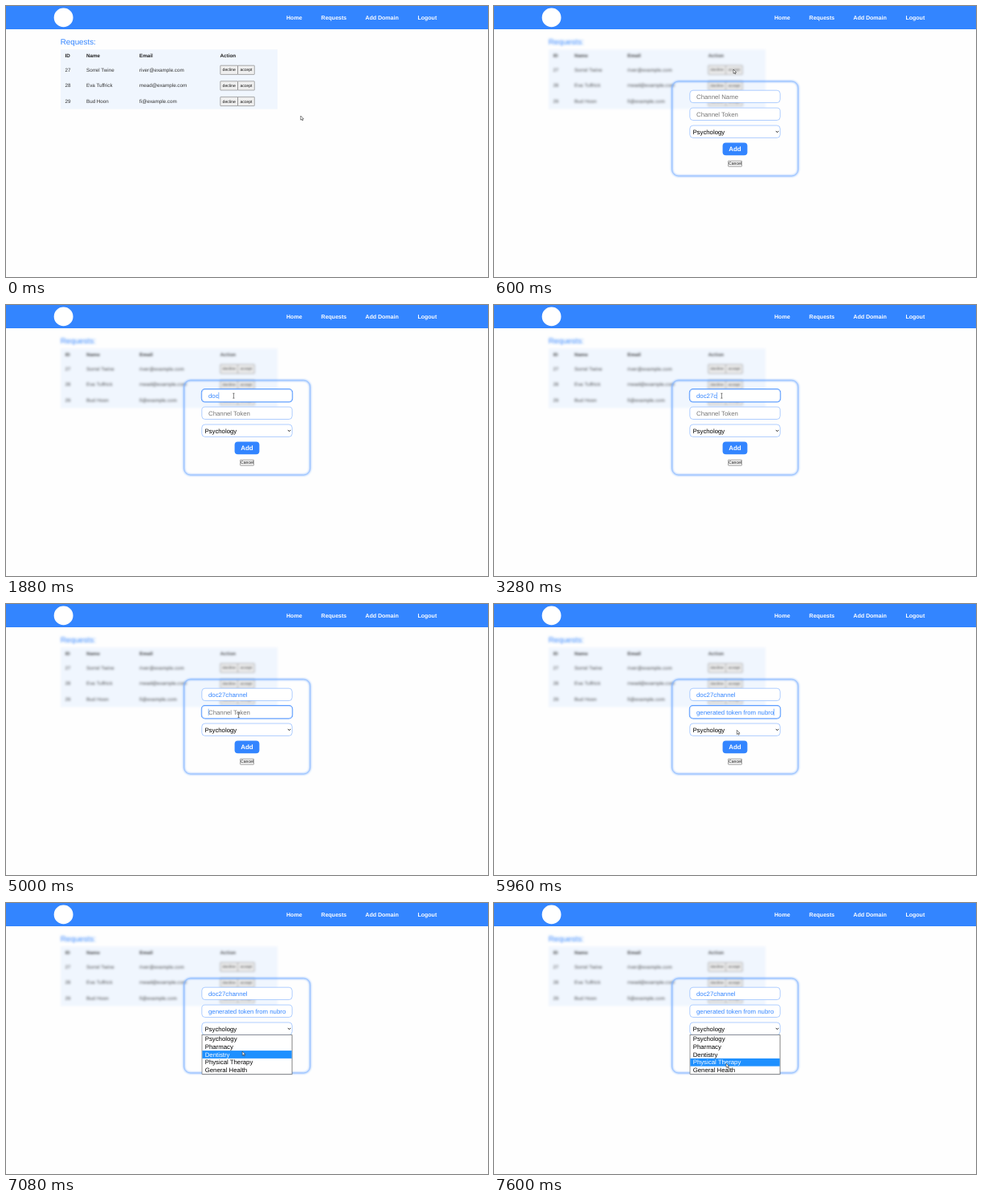
An HTML page for the animation above (8 s loop, 600 px wide and 338 px high).

```html
<!DOCTYPE html>
<html lang="en">
<head>
<meta charset="utf-8">
<title>Requests</title>
<style>
  html, body { margin: 0; width: 100%; height: 100%; overflow: hidden; background: #fefefe; }
  svg { display: block; width: 100%; height: 100%; }
  text { font-family: "Liberation Sans", Arial, sans-serif; white-space: pre; text-rendering: geometricPrecision; }
  .bold { font-weight: bold; }
</style>
</head>
<body>
<svg id="stage" viewBox="0 0 600 338">
  <defs>
    <filter id="soft" filterUnits="userSpaceOnUse" x="50" y="30" width="310" height="115">
      <feGaussianBlur stdDeviation="1.6"/>
    </filter>
    <filter id="glow" filterUnits="userSpaceOnUse" x="210" y="84" width="180" height="140">
      <feGaussianBlur stdDeviation="1.2"/>
    </filter>
    <filter id="ring" filterUnits="userSpaceOnUse" x="236" y="98" width="128" height="50">
      <feGaussianBlur stdDeviation="0.6"/>
    </filter>
  </defs>
</svg>
<script>
const BLUE = '#3385ff', LOOP = 8000, STEP = 40;
const stage = document.getElementById('stage');

function add(parent, tag, attrs, text) {
  const el = document.createElementNS('http://www.w3.org/2000/svg', tag);
  for (const k in attrs) el.setAttribute(k, attrs[k]);
  if (text !== undefined) el.textContent = text;
  parent.appendChild(el);
  return el;
}
const rect = (p, x, y, width, height, attrs) => add(p, 'rect', { x, y, width, height, ...attrs });
const label = (p, x, y, size, fill, text, cls = '') =>
  add(p, 'text', { x, y, 'font-size': size, fill, class: cls }, text);
const group = (p, attrs = {}) => add(p, 'g', attrs);
const show = (el, on) => el.setAttribute('visibility', on ? 'visible' : 'hidden');

function button(p, x, y, w, h, tx, ty, text) {
  const box = rect(p, x, y, w, h, { fill: '#efefef', stroke: '#767676', 'stroke-width': 0.6, rx: 0.5 });
  label(p, tx, ty, 5.1, '#111', text);
  return box;
}

// Header
rect(stage, 0, 0, 600, 29, { fill: BLUE });
add(stage, 'circle', { cx: 71.6, cy: 14.4, r: 11.9, fill: '#fff' });
[[349, 'Home'], [392.3, 'Requests'], [447.3, 'Add Domain'], [512.4, 'Logout']]
  .forEach(([x, s]) => label(stage, x, 17, 7.05, '#fff', s, 'bold'));

// Request list
const list = group(stage);
label(list, 67.7, 48, 9.8, BLUE, 'Requests:');
rect(list, 68, 54.3, 270, 74.2, { fill: '#f0f6fe' });
const cols = [73.6, 100, 166, 266.6];
['ID', 'Name', 'Email', 'Action'].forEach((s, i) => label(list, cols[i], 64.2, 6.25, '#222', s, 'bold'));
const accepts = [
  ['27', 'Sorrel Twine', 'river@example.com'],
  ['28', 'Eva Tuffrick', 'mead@example.com'],
  ['29', 'Bud Hoon', 'fi@example.com']
].map((row, r) => {
  const y = r * 19.6;
  row.forEach((s, i) => label(list, cols[i], 81.7 + y, 6.25, '#333', s));
  button(list, 266.8, 74.2 + y, 21.7, 11.2, 269.6, 81.4 + y, 'decline');
  return button(list, 288.5, 74.2 + y, 20.8, 11.2, 291.4, 81.4 + y, 'accept');
});

// Dialog: see-through, so the blurred list stays visible behind it
const dialog = group(stage);
const panel = { x: 221.6, y: 94, width: 157, height: 118, rx: 8, fill: 'none' };
add(dialog, 'rect', { ...panel, stroke: BLUE, 'stroke-width': 2, opacity: 0.5, filter: 'url(#glow)' });
add(dialog, 'rect', { ...panel, stroke: '#8cb9ff', 'stroke-width': 0.7 });

const edge = { rx: 4, fill: '#fff', stroke: '#85b4ff', 'stroke-width': 0.65 };
function field(y, hint) {
  const ring = rect(dialog, 243.8, y, 112.4, 15.4,
    { rx: 4, fill: 'none', stroke: BLUE, 'stroke-width': 2, opacity: 0.85, filter: 'url(#ring)' });
  rect(dialog, 243.8, y, 112.4, 15.4, edge);
  const text = label(dialog, 252, y + 10.5, 7.8, BLUE, '');
  const caret = rect(dialog, 252, y + 3.6, 0.6, 8.4, { fill: BLUE });
  return (value, focus, blink) => {
    text.textContent = value || hint;
    text.setAttribute('fill', value ? BLUE : '#757575');
    caret.setAttribute('x', 252 + (value ? text.getComputedTextLength() : -0.2));
    show(ring, focus);
    show(caret, focus && blink);
  };
}
const nameField = field(105.2, 'Channel Name');
const tokenField = field(127.1, 'Channel Token');

rect(dialog, 243.8, 149, 112.4, 15.4, edge);
label(dialog, 247.4, 159.6, 7.8, '#000', 'Psychology');
add(dialog, 'path', { d: 'M350.9 155.9l1.7 1.8 1.7-1.8', fill: 'none', stroke: '#111', 'stroke-width': 0.9 });
rect(dialog, 284.6, 170.6, 30.8, 15.7, { rx: 4, fill: BLUE });
label(dialog, 292.2, 181.1, 8, '#fff', 'Add', 'bold');
button(dialog, 291.5, 193.1, 17, 7.1, 292.1, 198.4, 'Cancel');

// Dropdown
const menu = group(stage);
const TOP = 164.6, ROW = 9.75;
rect(menu, 244.4, 165.2, 112.4, 49.2, { fill: '#000', opacity: 0.15 });
rect(menu, 244, 164.5, 112, 49.1, { fill: '#fff', stroke: '#555', 'stroke-width': 0.6 });
const mark = rect(menu, 244.3, TOP, 111.4, ROW, { fill: '#1e90ff' });
const options = ['Psychology', 'Pharmacy', 'Dentistry', 'Physical Therapy', 'General Health']
  .map((s, i) => label(menu, 247.7, TOP + 7.5 + i * ROW, 7.8, '#000', s));

// Pointers
const arrow = add(stage, 'path', {
  d: 'M0 0V5.2L1.2 4.1 2 5.9 2.9 5.5 2.1 3.8H3.7Z', fill: '#fff', stroke: '#222', 'stroke-width': 0.55
});
const beam = add(stage, 'path', {
  d: 'M-1.1 -3H1.1M0 -3V3M-1.1 3H1.1', fill: 'none', stroke: '#333', 'stroke-width': 0.6
});

// Pointer path: time, x, y
const path = [
  [0, 366.8, 137], [440, 298, 79], [600, 298, 79], [1000, 283.4, 113.2],
  [4640, 283.4, 113.2], [4840, 288, 153], [5000, 289.6, 138.5], [5640, 289.6, 138.5],
  [6000, 302.8, 158], [6440, 302.8, 158], [6600, 302.7, 158], [7080, 294.2, 185],
  [7280, 292, 193], [7480, 289.5, 202], [7600, 289, 200]
];
function pointer(t) {
  const i = path.findIndex(p => p[0] > t);
  if (i < 0) return path[path.length - 1].slice(1);
  const [t0, x0, y0] = path[i - 1], [t1, x1, y1] = path[i];
  const u = (t - t0) / (t1 - t0), k = u * u * (3 - 2 * u);
  return [x0 + (x1 - x0) * k, y0 + (y1 - y0) * k];
}

const word = 'doc27channel';
const keys = [1520, 1800, 1880, 2200, 3040, 3280, 3400, 3520, 3720, 3840, 3920, 4120];
const OPEN = 600, FOCUS = 1160, NEXT = 4960, PASTE = 5640, DROP = 6320;
const resets = [FOCUS, ...keys, NEXT, PASTE];

function draw(t) {
  const [x, y] = pointer(t);
  const open = t >= OPEN, drop = t >= DROP;

  if (open) list.setAttribute('filter', 'url(#soft)');
  else list.removeAttribute('filter');
  const hover = !open && x < 309.3 && y > 74.2 && y < 85.4;
  accepts[0].setAttribute('fill', hover ? '#e2e2e2' : '#efefef');

  dialog.setAttribute('display', open ? 'inline' : 'none');
  if (open) {
    const last = resets.filter(k => k <= t).pop() || 0;
    const blink = (t - last) % 1060 < 530;
    nameField(word.slice(0, keys.filter(k => k <= t).length), t >= FOCUS && t < NEXT, blink);
    tokenField(t >= PASTE ? 'generated token from nubro' : '', t >= NEXT && !drop, blink);
  }

  menu.setAttribute('display', drop ? 'inline' : 'none');
  const pick = Math.max(0, Math.floor((y - TOP) / ROW));
  mark.setAttribute('y', TOP + Math.min(pick, 4) * ROW);
  options.forEach((o, i) => o.setAttribute('fill', i === pick ? '#fff' : '#000'));

  const inField = open && x > 244 && x < 356 && ((y > 105 && y < 121) || (y > 127 && y < 143));
  for (const el of [arrow, beam]) el.setAttribute('transform', `translate(${x} ${y})`);
  show(arrow, !inField);
  show(beam, inField);
}

const start = performance.now();
function tick() {
  const t = (performance.now() - start) % LOOP;
  draw(Math.floor(t / STEP) * STEP);
  requestAnimationFrame(tick);
}
tick();
</script>
</body>
</html>
```
